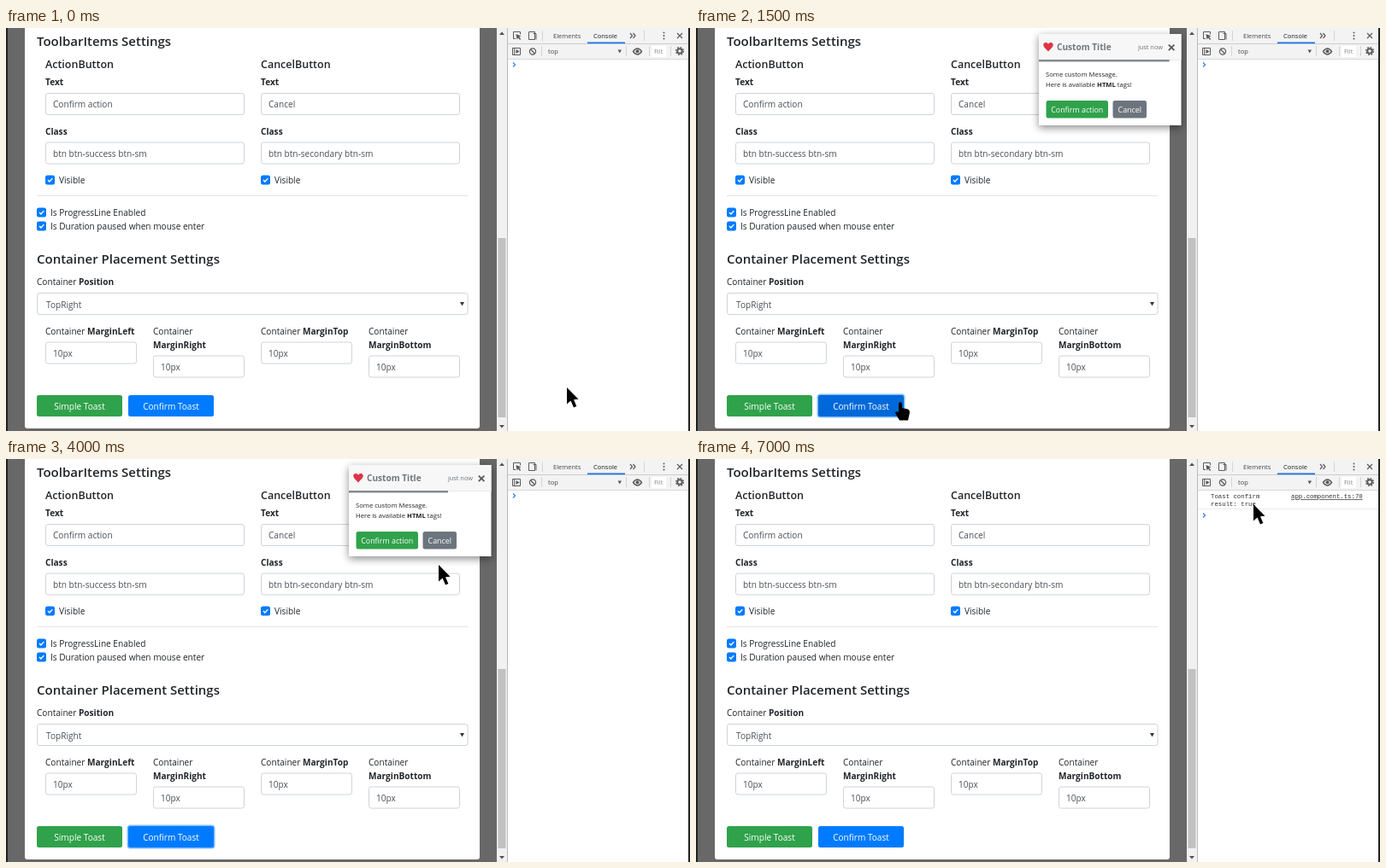
Write an HTML page that moves like this. It is 800 by 472 pixels and loops after 7100 ms.

```html
<!DOCTYPE html>
<html lang="en">
<head>
<meta charset="utf-8">
<title>Toast demo</title>
<style>
html, body { margin: 0; height: 100%; overflow: hidden; }
svg { display: block; width: 800px; height: 472px; background: #686868; }
text { font: 10.1px "Open Sans", "Noto Sans", sans-serif; fill: #212529; white-space: pre; }
.h4 { font-size: 15px; font-weight: 600; }
.h5 { font-size: 12.5px; font-weight: 600; }
.b { font-weight: 700; }
.value { fill: #495057; }
.on { fill: #fff; text-anchor: middle; }
.small { font-size: 7.65px; }
.action { font-size: 8.85px; }
.tool { font-size: 7.5px; fill: #444; }
.log { font: 7.35px "Liberation Mono", monospace; fill: #303030; }
.field { fill: #fff; stroke: #ced4da; }
.icon { fill: none; stroke: #5a5a5a; }
.solid { fill: #5a5a5a; }
#toast { filter: drop-shadow(0 3px 5px rgba(0, 0, 0, .45)); }
</style>
</head>
<body>
<svg id="stage" viewBox="0 0 800 472"></svg>
<script>
const LOOP = 7100;
const COLUMNS = [46, 172, 298, 424];
const stage = document.getElementById('stage');

// Rectangles that turn the pointer into a text beam or a hand
const fields = [], pageButtons = [[36, 430, 100, 25], [143, 430, 100, 25]];
const toastButtons = [[409.5, 85, 72.5, 20.5], [487.5, 85, 39.5, 20.5]];

const text = (x, y, s, cls = '') => `<text x="${x}" y="${y}" class="${cls}">${s}</text>`;
const bold = s => `<tspan class="b">${s}</tspan>`;
const rect = (x, y, w, h, attrs) => `<rect x="${x}" y="${y}" width="${w}" height="${h}" ${attrs}/>`;
const fill = color => `fill="${color}"`;
const path = (d, attrs) => `<path d="${d}" ${attrs}/>`;

function field(x, y, w, value) {
  fields.push([x, y, w, 26]);
  return rect(x + .5, y + .5, w - 1, 25, 'class="field" rx="2.5"') + text(x + 9, y + 17.2, value, 'value');
}

const checkbox = (x, y, label) =>
  rect(x, y, 11, 11, 'fill="#007bff" rx="2.5"') +
  path(`M${x + 3} ${y + 5.6}l1.9 1.9 3.4-3.9`, 'fill="none" stroke="#fff" stroke-width="1.4"') +
  text(x + 16, y + 9.7, label);

const button = ([x, y, w, h], color, label, id, cls = '') =>
  rect(x, y, w, h, `id="${id}" fill="${color}" rx="2.5" stroke-width="3" paint-order="stroke"`) +
  text(x + w / 2, y + h / 2 + (cls ? 3.6 : 4), label, 'on ' + cls);

const toolbarItem = (x, name, label, cls) =>
  text(x, 46.7, name, 'h5') +
  text(x, 67, 'Text', 'b') + field(x, 76, 233, label) +
  text(x, 124.5, 'Class', 'b') + field(x, 133.5, 233, cls) +
  checkbox(x, 172.5, 'Visible');

const margin = (side, i) => {
  const x = COLUMNS[i], wrapped = i % 2;
  return text(x, 358.5, 'Container ' + (wrapped ? '' : bold('Margin' + side))) +
    (wrapped ? text(x, 374.7, 'Margin' + side, 'b') : '') +
    field(x, wrapped ? 383.5 : 367.5, 107, '10px');
};

const page =
  rect(0, 0, 2, 472, fill('#222')) +
  rect(22, -10, 532, 479, 'fill="#fff" rx="3"') +
  text(36, 20.7, 'ToolbarItems Settings', 'h4') +
  toolbarItem(46, 'ActionButton', 'Confirm action', 'btn btn-success btn-sm') +
  toolbarItem(298, 'CancelButton', 'Cancel', 'btn btn-secondary btn-sm') +
  rect(36, 196, 504, 1, fill('#e4e4e4')) +
  checkbox(36, 210.5, 'Is ProgressLine Enabled') +
  checkbox(36, 226.5, 'Is Duration paused when mouse enter') +
  text(36, 276, 'Container Placement Settings', 'h4') +
  text(36, 301, 'Container ' + bold('Position')) +
  rect(36.5, 310.5, 503.5, 25, 'class="field" rx="2.5"') +
  text(47, 327.5, 'TopRight', 'value') + path('M531 321h5l-2.5 4.5z', fill('#333')) +
  ['Left', 'Right', 'Top', 'Bottom'].map(margin).join('') +
  button(pageButtons[0], '#30a24b', 'Simple Toast', 'simple') +
  button(pageButtons[1], '#007bff', 'Confirm Toast', 'confirm');

const toast =
  `<g clip-path="url(#view)"><g id="slide"><g id="toast">` +
  rect(401, 7, 166.5, 107, fill('#fff')) + rect(401, 7, 166.5, 30.5, fill('#f7f7f7')) +
  rect(401, 37, 166.5, .7, fill('#e2e2e2')) + '</g>' +
  path('M412 27.5C408 23.5 406.3 22 406.3 19.8C406.3 16.6 410.6 16 412 19C413.4 16 417.7 16.6 417.7 19.8C417.7 22 416 23.5 412 27.5Z', fill('#dc3545')) +
  `<g ${'style="opacity:.98"'}>` + text(422, 26.2, 'Custom Title', 'b" style="fill:#6c757d') + '</g>' +
  text(517, 25.2, 'just now', 'small" style="font-size:7.35px;fill:#6c757d') +
  path('M552.8 19.6l6.6 6.6m0-6.6l-6.6 6.6', 'stroke="#555" stroke-width="1.7"') +
  rect(401, 37, 166, 2.5, 'id="bar" fill="#868b90"') +
  text(409, 57, 'Some custom Message.', 'small') +
  text(409, 69, `Here is available ${bold('HTML')} tags!`, 'small') +
  button(toastButtons[0], '#30a24b', 'Confirm action', 'accept', 'action') +
  button(toastButtons[1], '#6c757d', 'Cancel', 'cancel', 'action') +
  '</g></g>';

const scrollbar =
  rect(574, 0, 12, 472, fill('#f1f1f1')) + rect(575.5, 246, 9, 210, fill('#c1c1c1')) +
  path('M577 8l3-3.5 3 3.5zM577 465l3 3.5 3-3.5z', fill('#505050'));

const separators = [[627, 3], [746, 3], [626, 21], [725, 21], [752, 21], [777, 21]]
  .map(([x, y]) => rect(x, y, 1, 12, fill('#d4d4d4'))).join('');

const devtools =
  rect(586, 0, 214, 472, fill('#fff')) + rect(586, 0, 212, 36, fill('#f3f3f3')) +
  rect(586, 18, 212, 1, fill('#ccc')) + rect(586, 36, 212, 1, fill('#d8d8d8')) +
  rect(586, 0, 1, 472, fill('#bbb')) + separators +
  path('M596 12.5h-2.5v-8h8v3M611.5 4.5h7v9h-7zM616.5 6.5h3.5v7', 'class="icon"') +
  path('M596.5 7l6 2.5-2.3 1 2 2.5-1.2 1-2-2.6-1.5 2z', 'class="solid"') +
  text(640, 12, 'Elements', 'tool') + text(687, 12, 'Console', 'tool" style="fill:#222') +
  rect(680, 16.5, 44, 1.7, fill('#1a73e8')) +
  path('M730 6l2.5 3-2.5 3M733.5 6l2.5 3-2.5 3', 'class="icon" stroke-width="1.2"') +
  [5.5, 9, 12.5].map(y => `<circle cx="769.5" cy="${y}" r="1" class="solid"/>`).join('') +
  path('M785 6l6 6m0-6l-6 6', 'class="icon" stroke-width="1.2"') +
  path('M592.5 23.5h9v8h-9zM594.7 23v8', 'class="icon"') + path('M596.5 25l4 2.5-4 2.5z', 'class="solid"') +
  '<circle cx="616" cy="27.5" r="3.6" class="icon" stroke-width="1.2"/>' +
  path('M613.5 25l5 5', 'class="icon" stroke-width="1.2"') +
  text(634, 30, 'top', 'tool') + path('M715.5 25.5h4.5l-2.2 4z', 'class="solid"') +
  path('M733.5 27.5Q738.5 20.5 743.5 27.5Q738.5 34.5 733.5 27.5Z', 'class="icon" stroke-width="1.3"') +
  '<circle cx="738.5" cy="27.3" r="2" class="solid"/>' +
  rect(755, 21, 17, 13, fill('#fff')) + text(758, 30, 'Filt', 'tool" style="fill:#888') +
  '<circle cx="788" cy="27" r="2.8" class="icon" stroke-width="2"/>' +
  '<circle cx="788" cy="27" r="4.4" class="icon" stroke-width="1.4" stroke-dasharray="1.73"/>' +
  '<g id="log">' + text(602, 46.3, 'Toast confirm', 'log') + text(602, 55.4, 'result: true', 'log') +
  text(696, 46.3, 'app.component.ts:70', 'log" text-decoration="underline') +
  rect(587, 58, 211, 1, fill('#ececec')) + '</g>' +
  path('M593 40.5l2.6 2.5-2.6 2.5', 'id="prompt" fill="none" stroke="#367cf1" stroke-width="1.2"') +
  rect(798, 0, 2, 472, fill('#222'));

const pointers = '<g id="pointer">' +
  path('M0 0V19.5L4.5 15.5L8 23.5L11.3 22L8 14.3L13.5 13.8Z', 'id="arrow"') +
  path('M-2 1.5Q0 -1.5 2 1.5V7L9 8.5Q11 9.5 11 12L9 21.5H-1L-6 13Q-6 10 -2 12Z', 'id="hand"') +
  path('M-3.5 1H3.5M-3.5 16H3.5M0 1V16', 'id="beam" stroke="#000" stroke-width="2.4"') + '</g>';

stage.innerHTML = '<clipPath id="view"><rect width="574" height="472"/></clipPath>' +
  page + toast + scrollbar + devtools + pointers;

const el = id => document.getElementById(id);
const set = (id, attrs) => Object.entries(attrs).forEach(([k, v]) => el(id).setAttribute(k, v));
const show = (id, on) => set(id, { visibility: on ? 'visible' : 'hidden' });
const clamp = v => Math.min(1, Math.max(0, v));
const inside = (x, y) => ([left, top, w, h]) => x >= left && x <= left + w && y >= top && y <= top + h;

// Each key is [time, ...values]; values run straight from key to key
const mouse = [
  [0, 656, 421], [100, 656, 421], [800, 239, 438], [1650, 239, 438], [2000, 322, 336],
  [2700, 470, 66], [3200, 470, 66], [3500, 522, 94], [3900, 506, 124], [4000, 506, 124],
  [4300, 510, 128], [4700, 497, 122], [5050, 463, 102], [5700, 463, 102], [5850, 467, 100],
  [6400, 467, 100], [6900, 652, 53], [LOOP, 652, 53]
];
const remaining = [[0, 166], [1100, 166], [2000, 136], [2600, 116], [4000, 116], [5060, 81], [LOOP, 81]];

function at(keys, t) {
  const i = keys.findIndex(key => key[0] > t);
  const a = keys[i - 1], b = keys[i], k = (t - a[0]) / (b[0] - a[0]);
  return a.slice(1).map((v, j) => v + (b[j + 1] - v) * k);
}

function pointerKind(x, y, toastShown) {
  const hit = inside(x, y);
  if (toastShown && hit([401, 7, 166, 107])) return toastButtons.some(hit) ? 'hand' : 'arrow';
  return pageButtons.some(hit) ? 'hand' : fields.some(hit) ? 'beam' : 'arrow';
}

function draw(t) {
  const [x, y] = at(mouse, t);
  const shown = clamp((t - 1070) / 200) - clamp((t - 5540) / 150);
  const pressed = t >= 5400;
  const hover = inside(x, y)(pageButtons[1]);

  set('slide', { transform: `translate(${166 * (1 - shown)} 0)`, opacity: shown });
  set('bar', { width: at(remaining, t)[0] });
  set('confirm', {
    fill: hover ? '#0069d9' : '#007bff',
    stroke: t >= 1000 && !pressed ? '#80bdff' : 'none'
  });
  set('accept', { fill: pressed ? '#218838' : '#30a24b', stroke: pressed ? '#94d3a2' : 'none' });

  const logged = t >= 5600;
  show('log', logged);
  set('prompt', { transform: `translate(0 ${logged ? 23 : 0})` });

  const kind = pointerKind(x, y, shown > 0);
  ['arrow', 'hand', 'beam'].forEach(id => show(id, id === kind));
  set('pointer', { transform: `translate(${x} ${y})` });
}

function frame() {
  draw(performance.now() % LOOP);
  requestAnimationFrame(frame);
}
frame();
</script>
</body>
</html>
```
